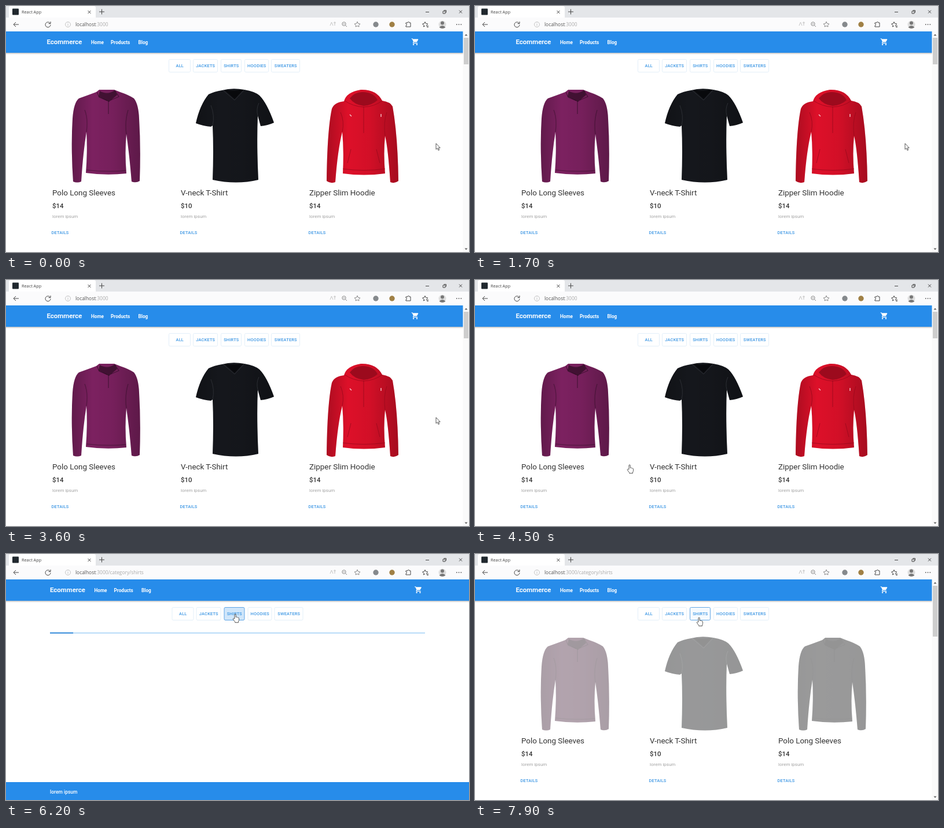
Recreate the animation shown at these times as an HTML page. Size 800 px wide and 426 px high, loop 8000 ms.

```html
<!DOCTYPE html>
<html lang="en">
<head>
<meta charset="utf-8">
<title>Shop</title>
<style>
html, body { margin: 0; width: 100%; height: 100%; overflow: hidden; background: #fff; }
svg { display: block; width: 800px; height: 426px; }
text { font-family: Roboto, sans-serif; white-space: pre; }
.ui { font-family: "Open Sans", sans-serif; }
.line { fill: none; stroke: #444; }
.btn { font-size: 7.4px; font-weight: 500; letter-spacing: .2px; fill: #3d97e4; }
.box { fill: #fff; stroke: #e3eff9; }
.hover .box { fill: #f5fafe; stroke: #64a7e4; }
.nav { font-size: 8.2px; font-weight: 700; fill: #fff; }
.name { font-size: 13.4px; fill: #333; }
.price { font-size: 11.4px; font-weight: 500; fill: #333; }
.note { font-size: 8px; fill: #a3a3a3; }
</style>
</head>
<body>
<svg viewBox="0 0 800 426">
  <defs>
    <linearGradient id="shade">
      <stop offset="0" stop-opacity=".22"/>
      <stop offset=".3" stop-opacity="0"/>
      <stop offset=".6" stop-opacity=".05"/>
      <stop offset="1" stop-opacity=".25"/>
    </linearGradient>
    <linearGradient id="drop" x2="0" y2="1">
      <stop offset="0" stop-opacity=".25"/>
      <stop offset="1" stop-opacity="0"/>
    </linearGradient>
    <path id="poloShape" d="M156 149L161 145H187L197 149Q212 154 221 160Q229 170 230 195Q233 245 231 303Q224 307 217 304Q213 255 208 222Q205 254 208 290Q173 294 138 289Q141 250 139 218Q133 255 130 304Q123 307 116 304Q112 245 115 195Q117 167 126 160Q140 155 156 149Z"/>
    <path id="teeShape" d="M373 146Q391 141 412 145Q430 148 438 155Q451 168 463 202Q452 207 440 208L435 190Q433 240 436 301Q398 310 357 301Q359 250 357 207L354 209Q341 208 328 203Q335 171 350 153Q360 148 373 146Z"/>
    <path id="hoodShape" d="M584 165Q588 149 613 145Q640 144 650 164Q664 166 668 174Q677 225 678 303Q671 308 664 305Q660 245 655 225Q652 255 655 290Q618 295 582 290Q584 250 581 218Q573 250 569 305Q561 308 554 303Q555 215 563 178Q567 167 584 165Z"/>
    <g id="polo">
      <use href="#poloShape"/><use href="#poloShape" fill="url(#shade)"/>
      <path d="M162 147Q175 155 188 146L192 154L178 166L160 157Z" fill="#000" opacity=".45"/>
      <path d="M157 149L161 158L175 164M188 146L195 157L181 163M177 164V187" fill="none" stroke="#000" stroke-opacity=".4" stroke-width="1.2"/>
      <path d="M139 218Q142 195 136 180M208 222Q205 200 211 180M139 284Q174 288 207 285" fill="none" stroke="#000" stroke-opacity=".25" stroke-width="1.5"/>
    </g>
    <g id="tee">
      <use href="#teeShape" fill="#15171c"/><use href="#teeShape" fill="url(#shade)"/>
      <path d="M378 146Q394 148 410 145L395 161Z" fill="#08090c"/>
      <path d="M375 146L395 163L412 145M357 207Q361 190 354 172M435 190Q432 178 437 168" fill="none" stroke="#2c2e34"/>
    </g>
    <g id="hood">
      <use href="#hoodShape" fill="#dd1029"/><use href="#hoodShape" fill="url(#shade)"/>
      <path d="M594 160Q603 148 618 149Q636 150 642 163Q632 172 618 173Q602 171 594 160Z" fill="#9c0a1d"/>
      <path d="M585 164Q600 174 618 175Q637 174 650 164M618 174V220M581 218Q585 200 578 184M655 225Q652 200 658 184M582 282Q618 287 655 282M590 272L596 248M646 272L640 248" fill="none" stroke="#95081b" stroke-opacity=".75"/>
      <path d="M594 188L597 191M648 187V192" stroke="#f6c6cb" stroke-width="1.4"/>
    </g>
  </defs>

  <g id="browser">
    <path fill="#e4e6e9" d="M0 0H800V20H0Z"/>
    <path fill="#fff" d="M5 20V3Q5 0 8 0H152Q155 0 155 3V20Z"/>
    <path fill="#fbfbfc" d="M0 20H800V44H0Z"/>
    <rect x="11" y="4.500" width="11" height="11" rx="1" fill="#20282e"/>
    <text class="ui" x="27" y="13" font-size="7.3" fill="#444">React App</text>
    <path class="line" d="M141.500 8L146.500 13M146.500 8L141.500 13M161 10H170M165.500 5.500V14.500M725 10.500H731M783 7.500L788 12.500M788 7.500L783 12.500M755 9H759V13H755ZM756.500 7.500H760.500V11.500"/>
    <path class="line" d="M22 32H13M17 28L13 32L17 36M76 29.500A4.500 4.500 0 1 0 77 32.500M77 27V30.500H73.500"/>
    <g class="line" style="stroke:#c4c4c4"><circle cx="107" cy="32" r="4.500"/><path d="M107 31V34.500M107 29V30M560 34L562.500 28L565 34M566 29H570M568 27V34"/></g>
    <text class="ui" x="120" y="35" font-size="8.4" fill="#555">localhost<tspan id="url" fill="#a9a9a9"></tspan></text>
    <g class="line" style="stroke:#888"><circle cx="584" cy="31" r="3.200"/><path d="M586.500 33.500L589 36M582.500 31H585.500M607 27L608.500 30.500L612 31L609.500 33.500L610 36L607 34.500L604 36L604.500 33.500L602 31L605.500 30.500Z"/></g>
    <circle cx="639" cy="32" r="4.700" fill="#85898c"/>
    <circle cx="667" cy="32" r="4.700" fill="#a08045"/>
    <path class="line" d="M691 29H694A1.500 1.500 0 0 1 697 29H699V36H691V34A1.500 1.500 0 0 0 691 31ZM724 27.500L725.500 30.500L729 31L726.500 33.500M724 27.500L722.500 30.500L719.500 31L722 33.500L721.500 36L724 34.500M726 34.500H730M727 36.500H730"/>
    <circle cx="754" cy="32" r="6.500" fill="#dedede"/>
    <path fill="#777" d="M751 29.500A3 3 0 0 1 757 29.500A3 3 0 0 1 751 29.500M748.500 37Q754 31 759.500 37Q754 41 748.500 37Z"/>
    <path fill="#444" d="M778 31.300h1.500v1.500h-1.500zM781.800 31.300h1.500v1.500h-1.500zM785.600 31.300h1.500v1.500h-1.500z"/>
  </g>

  <path fill="#278cea" d="M0 44H800V81H0Z"/>
  <path fill="url(#drop)" d="M0 81H800V84H0Z"/>
  <g id="top">
    <text x="70.500" y="66" font-size="11.3" font-weight="500" fill="#fff" letter-spacing=".08" stroke="#fff" stroke-width=".2">Ecommerce</text>
    <text class="nav" x="147" y="65.500">Home</text>
    <text class="nav" x="181" y="65.500">Products</text>
    <text class="nav" x="228.500" y="65.500">Blog</text>
    <path transform="translate(700 55) scale(.586)" fill="#fff" d="M7 18c-1.100 0-1.990.9-1.990 2S5.900 22 7 22s2-.9 2-2-.9-2-2-2zM1 2v2h2l3.600 7.590-1.350 2.450c-.16.28-.25.61-.25.96 0 1.100.9 2 2 2h12v-2H7.420c-.14 0-.25-.11-.25-.25l.03-.12.9-1.630h7.450c.75 0 1.410-.41 1.750-1.030l3.580-6.490c.08-.14.12-.31.12-.48 0-.55-.45-1-1-1H5.210l-.94-2H1zm16 16c-1.100 0-1.990.9-1.990 2s.89 2 1.990 2 2-.9 2-2-.9-2-2-2z"/>
    <g id="filters"></g>
  </g>

  <g id="cards"></g>

  <g id="loading">
    <path fill="#b5daf8" d="M76 135.700H724V137.700H76Z"/>
    <rect class="bar" y="135.700" height="2" fill="#3b8edb"/>
    <rect class="bar" y="135.700" height="2" fill="#3b8edb"/>
    <path fill="#278cea" d="M0 395H800V426H0Z"/>
    <text x="76" y="415" font-size="8.5" font-weight="500" fill="#fff">lorem ipsum</text>
  </g>

  <g id="scroll">
    <path fill="#fafafa" d="M789.500 44H800V426H789.500Z"/>
    <rect id="thumb" x="791" y="55" width="8" fill="#cdcdcd"/>
    <path fill="#666" d="M792.500 51.500L795 48.500L797.500 51.500ZM792.500 419.500L795 422.500L797.500 419.500Z"/>
  </g>

  <g id="cursor" fill="#fff" stroke="#444" stroke-width=".9" stroke-linejoin="round">
    <path id="arrow" d="M0 0V10.300L2.400 8.200L4 12L5.700 11.300L4.200 7.700H7.200Z"/>
    <path id="hand" d="M-1 8V1Q-1 0 0 0Q1.200 0 1.200 1V5.200Q2.500 4.600 3.200 5.700Q4.500 5.200 5 6.300Q6.500 6 6.500 7.500V10.500Q6.300 12 5.500 13V14.700H-.3V13.500Q-2.500 11 -3.700 8.700Q-3.600 7.300 -2.300 7.500Z"/>
  </g>
</svg>

<script>
const LOOP = 8000, FRAME = 100, LOAD = 6100, READY = 7600;
const $ = id => document.getElementById(id);
const clamp = v => Math.max(0, Math.min(1, v));

const filters = [['ALL', 281, 319], ['JACKETS', 323, 366], ['SHIRTS', 371, 407], ['HOODIES', 412, 454], ['SWEATERS', 458, 508]];
$('filters').innerHTML = filters.map(([label, l, r]) => `<g>
  <rect class="box" x="${l + .5}" y="92.500" width="${r - l - 1}" height="22" rx="2"/>
  <rect class="ripple" x="${l + .5}" y="92.500" width="${r - l - 1}" height="22" rx="2" fill="#278cea" opacity="0"/>
  <text class="btn" x="${(l + r) / 2 + .3}" y="106" text-anchor="middle">${label}</text></g>`).join('');
const buttons = [...$('filters').children];
const ripple = buttons[2].querySelector('.ripple');

const polo = (fill, dx) => `<use href="#polo" x="${dx}" fill="${fill}"/>`;
const card = (x, art, name, price) => `<g class="art">${art}</g>
  <text class="name" x="${x}" y="327.500">${name}</text>
  <text class="price" x="${x}" y="349.500">$${price}</text>
  <text class="note" x="${x}" y="367">lorem ipsum</text>
  <text class="btn" x="${x - 1.5}" y="394.500">DETAILS</text>`;
const firstTwo = card(80, polo('#7c2160', 0), 'Polo Long Sleeves', 14) +
  card(302, '<use href="#tee"/>', 'V-neck T-Shirt', 10);
const all = firstTwo + card(524, '<use href="#hood"/>', 'Zipper Slim Hoodie', 14);
const shirts = firstTwo + card(524, polo('#1b1b1e', 444), 'Polo Long Sleeves', 14);

// time, x, y of the pointer tip
const path = [[3600, 743, 238], [3800, 747, 285], [4000, 611, 334], [4200, 420, 343], [4400, 267, 320],
  [4700, 267, 320], [5000, 304, 158], [5300, 334.5, 104], [5500, 334.5, 104], [5900, 396, 104],
  [7600, 396, 104], [7900, 387, 110]];

function pointer(t) {
  const i = path.findIndex(p => p[0] > t);
  if (i < 1) return (i ? path.at(-1) : path[0]).slice(1);
  const [a, b] = [path[i - 1], path[i]], k = (t - a[0]) / (b[0] - a[0]);
  return [a[1] + (b[1] - a[1]) * k, a[2] + (b[2] - a[2]) * k];
}

function bezier(x, x1, y1, x2, y2) {
  const at = (s, a, b) => 3 * s * (1 - s) ** 2 * a + 3 * s * s * (1 - s) * b + s ** 3;
  let lo = 0, hi = 1;
  for (let i = 0; i < 24; i++) {
    const mid = (lo + hi) / 2;
    at(mid, x1, x2) < x ? lo = mid : hi = mid;
  }
  return at(lo, y1, y2);
}

const bars = document.querySelectorAll('.bar');
function setBar(bar, left, right) {
  const l = clamp(left), r = clamp(right);
  bar.setAttribute('x', 76 + 648 * l);
  bar.setAttribute('width', 648 * Math.max(0, r - l));
}

const show = (id, on) => $(id).style.display = on ? '' : 'none';
let shown;

function draw(t) {
  const busy = t >= LOAD && t < READY, done = t >= READY, shift = busy ? 5.5 : 0;
  $('url').textContent = t >= LOAD ? ':3000/category/shirts' : ':3000';
  $('top').setAttribute('transform', `translate(${shift})`);
  show('cards', !busy);
  show('scroll', !busy);
  show('loading', busy);
  $('thumb').setAttribute('height', done ? 88 : 46);

  const list = done ? shirts : all;
  if (shown !== list) $('cards').innerHTML = shown = list;
  const fade = clamp((t - READY) / 300 * .44);
  for (const art of document.querySelectorAll('.art')) {
    art.style.opacity = done ? fade : 1;
    art.style.filter = done ? `saturate(${.2 + fade * .4})` : 'none';
  }

  const e1 = bezier(clamp((t - 6167) / 1260), .65, .815, .735, .395);
  const e2 = bezier(clamp((t - 7337) / 1260), .165, .84, .44, 1);
  setBar(bars[0], -.35 + 1.35 * e1, 1.9 * e1);
  setBar(bars[1], -2 + 3.07 * e2, 1.08 * e2);
  ripple.setAttribute('opacity', t >= LOAD ? .18 * clamp((6600 - t) / 400) : 0);

  const [x, y] = pointer(t);
  let hot = !busy && y > 135 && y < 376 && [70.6, 292.6, 514.6].some(l => x > l && x < l + 203);
  filters.forEach(([, l, r], i) => {
    const over = y > 92 && y < 115 && x > l + shift && x < r + shift;
    buttons[i].classList.toggle('hover', over);
    hot ||= over;
  });
  $('cursor').setAttribute('transform', `translate(${x} ${y})`);
  show('hand', hot);
  show('arrow', !hot);
}

function tick() {
  const t = performance.now() % LOOP;
  draw(Math.floor(t / FRAME) * FRAME);
  requestAnimationFrame(tick);
}
tick();
</script>
</body>
</html>
```
